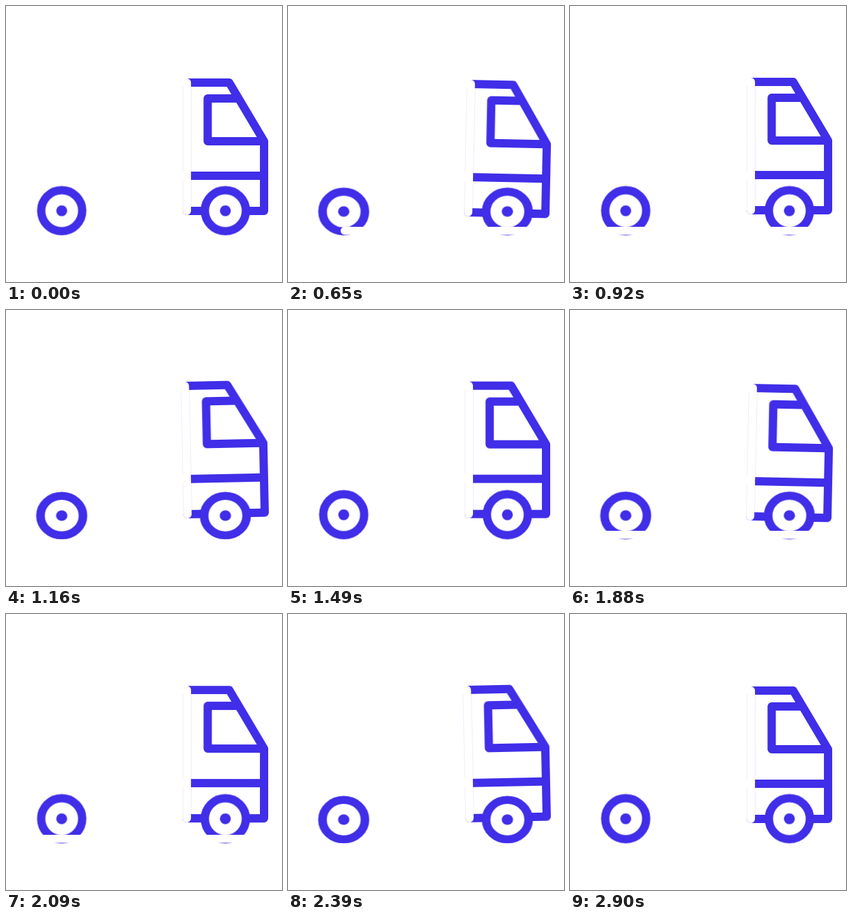
Write an HTML page without scripts that moves like this. It is 400 px wide and 400 px high and loops after 2930 ms.

```html
<!DOCTYPE html>
<html lang="en">
<head>
<meta charset="utf-8">
<title>Truck</title>
<style>
  html, body { margin: 0; width: 100%; height: 100%; overflow: hidden; background: #fff; }
  svg { display: block; width: 100%; height: 100%; }

  .ink { fill: none; stroke: #402ee8; stroke-width: 12; stroke-linejoin: round; }
  .box { fill: none; stroke: #fff; stroke-width: 12; stroke-linecap: round; stroke-linejoin: round; }
  .road { stroke: #fff; stroke-width: 11.5; stroke-linecap: round; }

  .body, .wheel, .road { animation: 2930ms ease-in-out infinite; }
  .body { transform-origin: 213px 250px; animation-name: rock; }
  .wheel { transform-origin: 0 0; animation-name: squash; }
  .road { animation-name: slide; animation-timing-function: linear; }

  /* A pause, then two equal rides */
  @keyframes rock {
    0%, 17.06%, 58.02%, 98.98%, 100% { transform: translateY(0) rotate(0deg); }
    22.7%, 63.65% { transform: translateY(1px) rotate(1.2deg); }
    31.4%, 72.35% { transform: translateY(-1px) rotate(0deg); }
    40.1%, 81.06% { transform: translateY(0) rotate(-1.2deg); }
    49.83%, 90.78% { transform: translateY(-1.4px) rotate(0deg); }
  }
  @keyframes squash {
    0%, 17.06%, 31.4%, 49.83%, 58.02%, 72.35%, 90.78%, 98.98%, 100% { transform: scale(1, 1); }
    22.7%, 63.65% { transform: scale(1.035, .968); }
    40.1%, 81.06% { transform: scale(1.037, .962); }
  }
  @keyframes slide {
    0%, 17.06%, 40.61%, 58.02%, 81.57%, 98.98%, 100% { transform: translateX(420px); }
    22.18%, 63.14% { transform: translateX(82px); }
    23.14%, 64.09% { transform: translateX(80px); }
    23.24%, 64.16%, 31.4%, 72.35% { transform: translateX(28px); }
    39.59%, 80.55% { transform: translateX(378px); }
  }
</style>
</head>
<body>
<svg viewBox="0 0 400 400">
  <defs>
    <g id="wheel">
      <circle class="ink" cy="-35.7" r="29.7" style="fill:#fff"/>
      <circle cy="-35.7" r="7.9" fill="#402ee8"/>
    </g>
  </defs>

  <g class="body">
    <path class="ink" d="M289 297H262.1V111H323.5L374 196V297H347M262 246H374M337 134H292.3V196H374"/>
    <path class="box" d="M32 111H262.1V297M32 246H262"/>
  </g>

  <g transform="translate(80.7 332.4)"><use href="#wheel" class="wheel"/></g>
  <g transform="translate(317.9 332.4)"><use href="#wheel" class="wheel"/></g>

  <path class="road" d="M0 325.8H400"/>
</svg>
</body>
</html>
```
